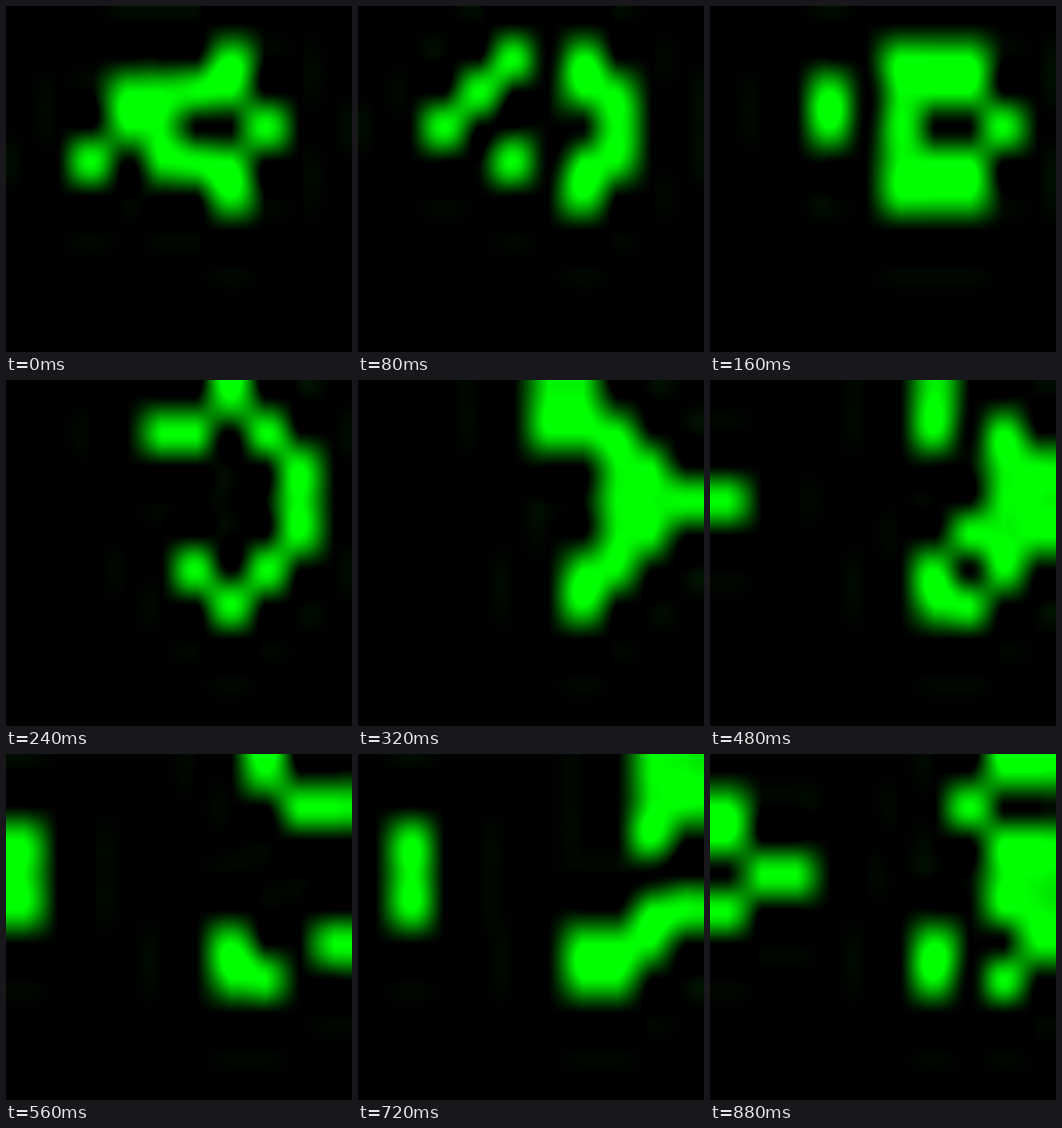
An HTML page with a canvas that plays this animation: 512 by 512 pixels, repeating every 960 ms.

```html
<!DOCTYPE html>
<html lang="en">
<head>
<meta charset="utf-8">
<title>Game of Life</title>
<style>
  html, body { margin: 0; width: 100%; height: 100%; overflow: hidden; background: #000; }
  canvas { display: block; }
</style>
</head>
<body>
<canvas id="stage" width="512" height="512"></canvas>
<script>
const SIZE = 512, N = 10, TICK = 80, TICKS = 12;
const ctx = document.getElementById('stage').getContext('2d');
const image = ctx.createImageData(SIZE, SIZE);
const range = [...Array(N).keys()];

const seed = [
  '..........',
  '......#...',
  '...####...',
  '...##..#..',
  '..#.###...',
  '......#...',
  '..........',
  '..........',
  '..........',
  '..........'
].map(row => [...row].map(c => +(c === '#')));

// One generation of Conway's rules on a torus
function evolve(grid) {
  return grid.map((row, y) => row.map((alive, x) => {
    let sum = -alive;
    for (let dy = -1; dy <= 1; dy++)
      for (let dx = -1; dx <= 1; dx++)
        sum += grid[(y + dy + N) % N][(x + dx + N) % N];
    return +(sum === 3 || (alive && sum === 2));
  }));
}

const generations = [seed];
while (generations.length < TICKS - 1) generations.push(evolve(generations.at(-1)));

// Lanczos-3 weights of the cells for each pixel along one axis
const sinc = x => x ? Math.sin(Math.PI * x) / (Math.PI * x) : 1;
const lanczos = x => Math.abs(x) < 3 ? sinc(x) * sinc(x / 3) : 0;
const weights = Array.from({ length: SIZE }, (_, p) => {
  const w = range.map(k => lanczos((p + 0.5) * N / SIZE - k - 0.5));
  const total = w.reduce((a, b) => a + b);
  return w.map(v => v / total);
});

const clampByte = v => Math.max(0, Math.min(255, Math.round(v)));

function blend(w, values) {
  let sum = 0;
  for (let k = 0; k < N; k++) sum += w[k] * values[k];
  return clampByte(sum);
}

function draw(grid) {
  const rows = grid.map(row => row.map(c => c * 255));
  for (let x = 0; x < SIZE; x++) {
    const column = rows.map(row => blend(weights[x], row));
    for (let y = 0; y < SIZE; y++) {
      const i = (y * SIZE + x) * 4;
      image.data[i + 1] = blend(weights[y], column);
      image.data[i + 3] = 255;
    }
  }
  ctx.putImageData(image, 0, 0);
}

const start = performance.now();
let shown = -1;

function frame() {
  const tick = Math.floor((performance.now() - start) / TICK) % TICKS;
  const index = tick > 9 ? tick - 1 : tick; // generation 9 is held for two ticks
  if (index !== shown) draw(generations[shown = index]);
  requestAnimationFrame(frame);
}
frame();
</script>
</body>
</html>
```
